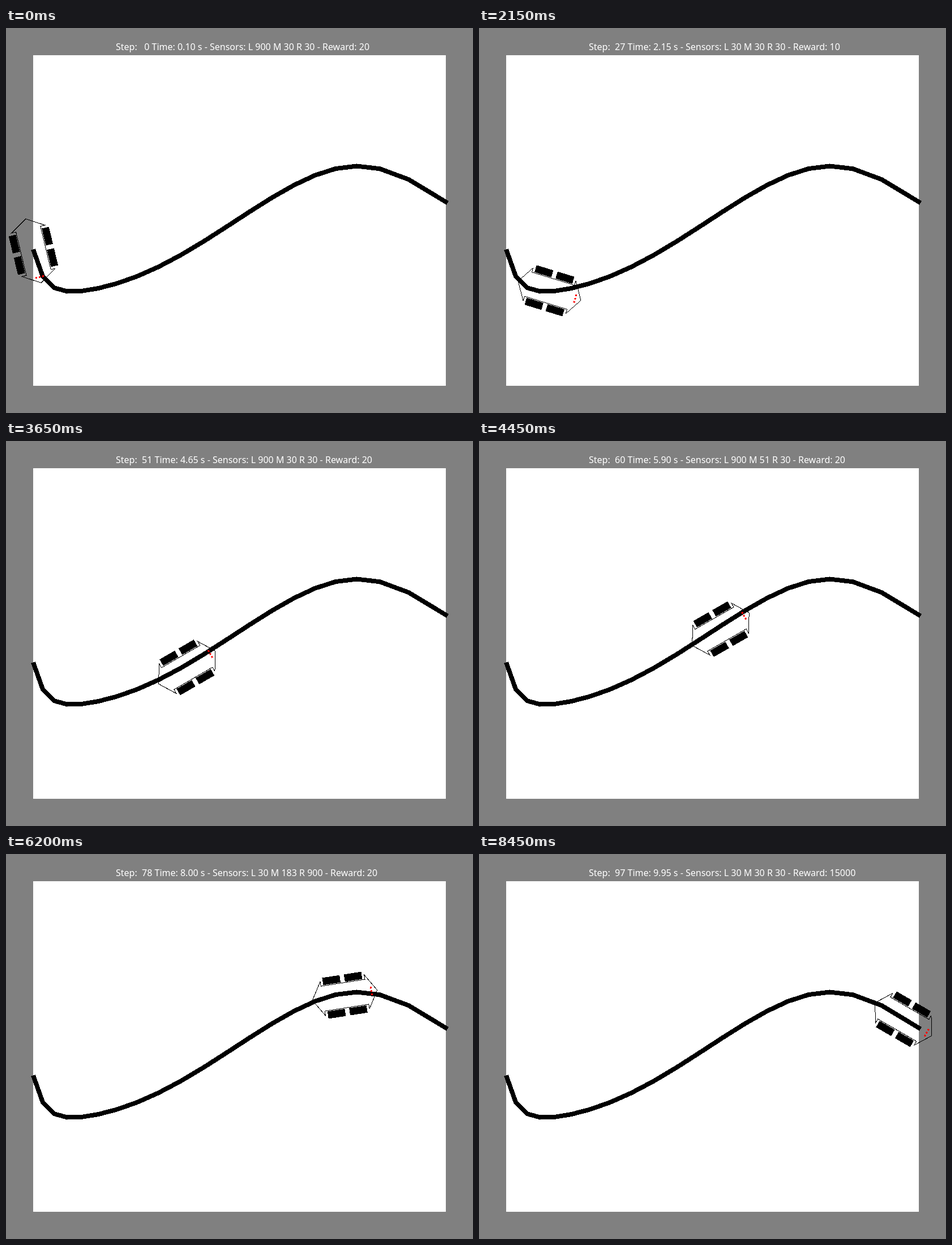
An HTML page that plays this animation: 825x679 px, repeating every 8.6 s.

```html
<!DOCTYPE html>
<html lang="en">
<head>
<meta charset="utf-8">
<title>Line follower</title>
<style>
  html, body { margin: 0; width: 100%; height: 100%; overflow: hidden; background: #808080; }
  svg { display: block; shape-rendering: crispEdges; }
  text { font: 16px "Noto Sans", "Open Sans", sans-serif; fill: #fff; white-space: pre; }
  polyline, polygon { fill: none; stroke: #000; }
</style>
</head>
<body>
<svg width="825" height="679" viewBox="0 0 825 679">
  <rect x="48" y="48" width="729" height="583" fill="#fff"/>
  <polyline id="track" stroke-width="8"/>
  <g id="car">
    <polygon points="58,0 39.3,30.3 39.3,22.2 -39.3,22.2 -39.3,30.3
                     -58,0 -39.3,-30.3 -39.3,-22.2 39.3,-22.2 39.3,-30.3"/>
  </g>
  <text id="label" x="194" y="39"></text>
</svg>
<script>
const [trackEl, car, label] = ['track', 'car', 'label'].map(id => document.getElementById(id));
const LOOP = 8600, LAST = 97;
const EYE = 47.5, GAP = 6;

// the track is a smooth curve through these nodes, drawn as 20 straight pieces
const nodes = [
  { i: 0, x: 48, y: 390.5 }, { i: 1, x: 65, y: 438 }, { i: 3, x: 108, y: 464.5 },
  { i: 6, x: 196, y: 450.5 }, { i: 10, x: 349, y: 376.5 }, { i: 14, x: 509, y: 277 },
  { i: 17, x: 619.5, y: 243.5 }, { i: 19, x: 711, y: 267 }, { i: 20, x: 780, y: 308.5 }
];

// ms: start on screen, sec: simulated time, mid: middle sensor
const keys = [
  { step: 0, ms: 0, sec: .1, x: 48.4, y: 393, deg: 76.5, mid: 30 },
  { step: 16, ms: 1500, sec: 1.3, x: 79.75, y: 447.1, deg: 42.8, mid: 30 },
  { step: 27, ms: 2150, sec: 2.15, x: 124.5, y: 463.4, deg: 17, mid: 30 },
  { step: 44, ms: 3300, sec: 3.9, x: 234, y: 442, deg: -25, mid: 30 },
  { step: 51, ms: 3650, sec: 4.65, x: 319.75, y: 399.4, deg: -30, mid: 30 },
  { step: 68, ms: 5100, sec: 7, x: 522.5, y: 272.3, deg: -29.6, mid: 70 },
  { step: 78, ms: 6200, sec: 8, x: 598.6, y: 249.1, deg: -8.9, mid: 183 },
  { step: LAST, ms: 8450, sec: 9.95, x: 749.75, y: 291.4, deg: 30, mid: 30 }
];

const rad = deg => deg * Math.PI / 180;
const snap = (value, unit) => Math.round(value / unit) * unit;

// Lagrange interpolation
function trackPoint(i) {
  let x = 0, y = 0;
  for (const n of nodes) {
    const weight = nodes.reduce((w, m) => m === n ? w : w * (i - m.i) / (n.i - m.i), 1);
    x += weight * n.x;
    y += weight * n.y;
  }
  return [x, y];
}

const track = Array.from({ length: 21 }, (_, i) => trackPoint(i));

function trackDistance(x, y) {
  return Math.min(...track.slice(1).map(([bx, by], i) => {
    const [ax, ay] = track[i], dx = bx - ax, dy = by - ay;
    const k = Math.max(0, Math.min(1, ((x - ax) * dx + (y - ay) * dy) / (dx * dx + dy * dy)));
    return Math.hypot(x - ax - dx * k, y - ay - dy * k);
  }));
}

// position follows a Hermite curve along the headings, the rest is linear
function stateAt(step) {
  const n = Math.max(1, keys.findIndex(key => key.step >= step));
  const a = keys[n - 1], b = keys[n];
  const k = (step - a.step) / (b.step - a.step), k2 = k * k, k3 = k2 * k;
  const chord = Math.hypot(b.x - a.x, b.y - a.y);
  const mix = name => a[name] + (b[name] - a[name]) * k;
  const curve = (name, slope) =>
    a[name] + (b[name] - a[name]) * (3 * k2 - 2 * k3) +
    chord * ((k3 - 2 * k2 + k) * slope(rad(a.deg)) + (k3 - k2) * slope(rad(b.deg)));
  return {
    ms: snap(mix('ms'), 50), sec: snap(mix('sec'), .05), mid: Math.round(mix('mid')),
    x: curve('x', Math.cos), y: curve('y', Math.sin), deg: mix('deg')
  };
}

function sense({ x, y, deg }, side) {
  const c = Math.cos(rad(deg)), s = Math.sin(rad(deg));
  return trackDistance(x + EYE * c - side * s, y + EYE * s + side * c) < 4 ? 900 : 30;
}

function makeFrame(_, step) {
  const state = stateAt(step);
  const left = sense(state, -GAP), right = sense(state, GAP);
  const onLine = Math.max(left, right) > 30, forward = Math.abs(state.deg) < 30;
  const reward = step === LAST ? 15000 : onLine ? 20 : forward ? 10 : 0;
  return {
    start: state.ms,
    pose: `translate(${state.x} ${state.y}) rotate(${state.deg})`,
    text: `Step: ${String(step).padStart(3)} Time: ${state.sec.toFixed(2)} s - ` +
      `Sensors: L ${left} M ${state.mid} R ${right} - Reward: ${reward}`
  };
}

function addBox(x, y, width, height, fill) {
  const box = document.createElementNS('http://www.w3.org/2000/svg', 'rect');
  const attrs = { x: x - width / 2, y: y - height / 2, width, height, fill };
  for (const name in attrs) box.setAttribute(name, attrs[name]);
  car.append(box);
}

trackEl.setAttribute('points', track.join(' '));
for (const u of [-19.4, 19.4]) for (const v of [-30, 30]) addBox(u, v, 31, 13, '#000');
for (const v of [-GAP, 0, GAP]) addBox(EYE, v, 3, 3, '#f00');

const frames = Array.from({ length: LAST + 1 }, makeFrame);
let shown;

function tick() {
  const t = performance.now() % LOOP;
  const frame = frames.findLast(f => f.start <= t);
  if (frame !== shown) {
    car.setAttribute('transform', frame.pose);
    label.textContent = frame.text;
    shown = frame;
  }
  requestAnimationFrame(tick);
}
tick();
</script>
</body>
</html>
```
